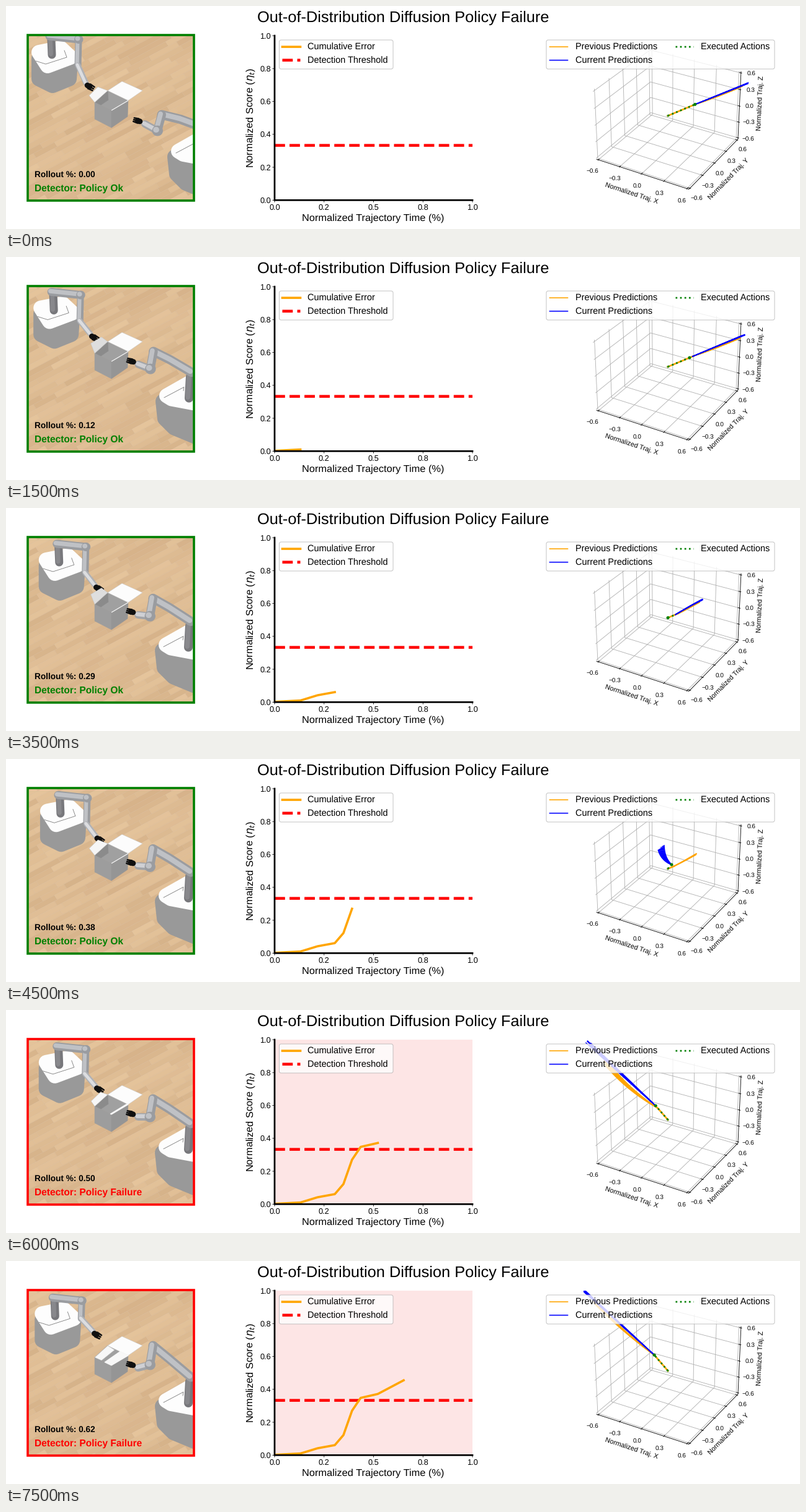
Recreate the animation shown at these times as a matplotlib script. Size 1280x361 px, loop 8 s.

```python
import numpy as np
import matplotlib.pyplot as plt
from matplotlib.animation import FuncAnimation
from matplotlib.collections import PolyCollection
from matplotlib.patches import Circle, FancyBboxPatch, Polygon, Rectangle

plt.rcParams["font.family"] = "Liberation Sans"
plt.rcParams["text.hinting"] = "none"
W, H, PT = 1280, 361, 0.72  # PT: points per pixel at 100 dpi
STEPS, TURN, ALARM = 16, 9, 10  # steps per loop, change of heading, detection

fig = plt.figure(figsize=(W / 100, H / 100), dpi=100, facecolor="white")
ax = fig.add_axes([0, 0, 1, 1])
ax.set_xlim(0, W)
ax.set_ylim(H, 0)
ax.axis("off")

panel = Rectangle((35, 47), 268, 268, transform=ax.transData)
plot_area = Rectangle((433, 48), 319, 266.3, transform=ax.transData)
cube_area = Rectangle((930.5, 48), 266, 266, transform=ax.transData)
live = []  # artists of the current step


def label(x, y, s, px, **kw):
    kw = {"va": "baseline", "zorder": 12, **kw}
    return ax.text(x, y, s, fontsize=px * PT, **kw)


def stroke(pts, color, px, z=3, clip=None, **kw):
    x, y = np.asarray(pts, float).T
    line, = ax.plot(x, y, color=color, lw=px * PT, zorder=z, snap=False, **kw)
    if clip is not None:
        line.set_clip_path(clip)
    return line


def mix(a, b, t):
    return np.array(a) * (1 - t) + np.array(b) * t


def smooth(t):
    t = np.clip(t, 0, 1)
    return t * t * (3 - 2 * t)


# ---------- chart ----------
X0, X1, Y0, Y1 = 433, 752, 314.3, 48


def chart(x, y):
    return np.c_[X0 + (X1 - X0) * np.asarray(x), Y0 + (Y1 - Y0) * np.asarray(y)]


def score(k):
    return np.interp(k, [0, 3, 5, 7, 8, 9, 10, 12, 15],
                     [.002, .01, .042, .061, .122, .27, .348, .372, .455])


def draw_chart():
    for v in np.linspace(0, 1, 6):
        y = Y0 + (Y1 - Y0) * v
        stroke([(X0 - 3.2, y), (X0, y)], "k", 0.8, 6)
        label(427, y + 4.4, f"{v:.1f}", 12.7, ha="right")
    for v in np.linspace(0, 1, 5):
        x = X0 + (X1 - X0) * v
        stroke([(x, Y0), (x, Y0 + 3.2)], "k", 0.8, 6)
        label(x, 329.4, f"{v:.1f}", 12.7, ha="center")
    stroke([(X0, Y1), (X0, Y0), (X1, Y0)], "k", 2.7, 6,
           solid_capstyle="projecting", solid_joinstyle="miter")
    stroke(chart([0, 1], [0.333, 0.333]), "red", 4.54, 4, plot_area, ls="--")
    label(592, 348, "Normalized Trajectory Time (%)", 16.4, ha="center")
    label(395, 181.5, r"Normalized Score ($\eta_t$)", 16.4, ha="center",
          va="center", rotation=90)


# ---------- 3D box ----------
def project(x, y, z):
    """Perspective view at elevation 30, azimuth -60."""
    p = np.array([x, y, z]) * [0.952, 0.952, 0.714]
    s3 = np.sqrt(3)
    u = p @ [s3 / 2, 0.5, 0]
    v = p @ [-0.25, s3 / 4, s3 / 2]
    d = p @ [s3 / 4, -0.75, 0.5]
    k = 1433 / (10 - d)
    return 1068.1 + u * k, 177.3 - v * k


def draw_cube():
    e = 0.625

    def edge(color, z, *pts):
        stroke([project(*p) for p in pts], color, 0.85, z)

    # label centres of the lowest and highest tick on each axis
    marks = (((945, 267), (1090, 315)), ((1113, 311), (1188, 232)),
             ((1196, 215), (1202, 109.5)))
    i1, i2 = e - 0.02, e + 0.01
    for i, t in enumerate(np.linspace(-0.6, 0.6, 5)):
        edge("#b0b0b0", 2, (t, -e, -e), (t, e, -e), (t, e, e))
        edge("#b0b0b0", 2, (e, t, -e), (-e, t, -e), (-e, t, e))
        edge("#b0b0b0", 2, (-e, -e, t), (-e, e, t), (e, e, t))
        edge("k", 3, (t, -i1, -e), (t, -i2, -e))
        edge("k", 3, (i1, t, -e), (i2, t, -e))
        edge("k", 3, (i1, e, t), (i2, e, t))
        for lo, hi in marks:
            x, y = mix(lo, hi, i / 4)
            label(x, y + 3.6, f"{t:.1f}".replace("-", "−"), 10, ha="center")
    edge("k", 3, (-e, -e, -e), (e, -e, -e), (e, e, -e), (e, e, e))
    for x, y, axis, rot in ((1008, 304, "X", -18.2), (1165, 281, "Y", 45.7),
                            (1217, 157.5, "Z", 87.4)):
        label(x, y, f"Normalized Traj. {axis}", 10.9, ha="center", va="center",
              rotation=rot, rotation_mode="anchor")


# ---------- legends ----------
def legend(x, w, entries):
    ax.add_patch(FancyBboxPatch((x + 3, 58), w - 6, 41,
                                boxstyle="round,pad=3,rounding_size=3",
                                fc="white", ec="#adadad", lw=0.9 * PT,
                                alpha=0.8, zorder=10))
    for dx, row, text, color, px, ls in entries:
        y = 66.1 + 21.6 * row
        stroke([(x + dx, y), (x + dx + 29, y)], color, px, 11, ls=ls)
        label(x + dx + 41, y + 5, text, 14.55)


# ---------- wooden floor ----------
def draw_floor():
    rng = np.random.default_rng(4)
    along, across = np.array([0.88, -0.47]), np.array([4.7, 7.1])
    polys, colors = [], []
    for row in range(-28, 29):
        s = -240 - rng.uniform(0, 60)
        while s < 240:
            n = rng.uniform(35, 80)
            a = np.array([170, 181]) + across * row + along * s
            b = a + along * n
            polys.append([a, b, b + across, a + across])
            colors.append(mix((0.84, 0.70, 0.54), (0.90, 0.77, 0.61), rng.random()))
            s += n
    floor = PolyCollection(polys, facecolors=colors, linewidths=0.4, zorder=1,
                           edgecolors=(0.79, 0.63, 0.46, 0.25))
    ax.add_collection(floor)
    floor.set_clip_path(panel)


# ---------- robots ----------
def poly(pts, fc, rim=0.5, ec=None):
    p = Polygon(pts, closed=True, fc=fc, ec=ec or fc, lw=rim * PT,
                joinstyle="round", zorder=3)
    ax.add_patch(p)
    p.set_clip_path(panel)
    live.append(p)


def rod(pts, color, px):
    live.append(stroke(pts, color, px, clip=panel, solid_capstyle="round",
                       solid_joinstyle="round"))


def limb(pts, px, dark="#9a9ca0", light="#bfc1c5"):
    pts = np.asarray(pts, float)
    rod(pts, dark, px)
    rod(pts - [px * 0.13, px * 0.1], light, px * 0.55)


def gripper(at, aim):
    aim = np.array(aim, float)
    side = aim[::-1] * [-0.5, 0.5]
    rod([at - aim * 0.4, at + aim * 0.1], "#101010", 9)
    for k in (-1, 0, 1):
        rod([at + side * k, at + aim + side * k * 0.8], "#101010", 2.6)


def pedestal(off, body, top, seam):
    poly(off + body, "#999999", 24)
    poly(off + top, "#fdfdfd", 24)
    live.append(stroke(off + seam, "#777777", 0.8, clip=panel))


def retreat(k):
    return smooth((k - 11) / 4)


def draw_left(k):
    lift = retreat(k)
    off = np.array([-7 * (1 + np.cos(np.pi * k / 9.5)),
                    0.15 * k - 8 * np.exp(-k / 1.4)])
    elbow = off + (131, 62)
    fore = off + (130, 104 - 13 * lift)
    hand = np.array([134 + 16 * np.sin(np.pi * k / 20), 130 - 11 * lift])
    pedestal(off, [(67, 92), (118, 96), (116, 126), (89, 137), (67, 126)],
             [(67, 83), (102, 76), (118, 91), (81, 105)],
             [(62, 97), (78, 102), (112, 91), (108, 80)])
    limb(off + [(88, 87), (87, 62)], 13, "#77777b", "#88888c")
    limb([off + (84, 57), elbow], 13)
    limb([elbow, fore], 11)
    limb([fore, hand - (5, 5)], 9, "#b0b2b6", "#dcdde0")
    limb([elbow, elbow + (0.5, 0)], 14)
    gripper(hand, (7, 4))


def draw_right(k):
    lift, fast, slow = retreat(k), np.exp(-k), np.exp(-k / 2.2)
    off = np.array([20 * fast - 2, 14 * slow + 5 * lift])
    shoulder = off + (300, 183)
    elbow = np.array([237 + 14 * fast, 145 + 31 * slow - 8 * lift])
    fore = np.array([232 + 12 * fast, 174 + 28 * slow - 6 * lift])
    hand = np.array([202 + 11 * fast, 168 + 18 * fast])
    pedestal(off, [(254, 230), (257, 258), (272, 273), (325, 295), (350, 220)],
             [(260, 221), (297, 200), (345, 215), (305, 233), (268, 226)],
             [(256, 224), (288, 207), (287, 213)])
    limb(off + [(296, 225), (298, 190)], 14, "#77777b", "#88888c")
    limb([shoulder, mix(shoulder, elbow, 0.5) - 3, elbow], 15)
    limb([elbow, fore], 14)
    limb([fore, hand + (11, 5)], 12, "#a2a4a8", "#cfd0d4")
    limb([fore, fore + (0.5, 0)], 17)
    gripper(hand, (-7, -2))


def draw_box(k):
    left, top, right, front = (143, 156), (164, 137), (197, 153), (170, 169)
    push, close = np.exp(-((k - 5) / 2) ** 2), retreat(k)
    a = mix((134 + 7 * push, 145 - 14 * push), (154, 161), close)
    b = mix((148 + 16 * push, 131 - 4 * push), (175, 144), close)
    poly([left, top, right, front], "#a0a0a0")
    poly([left, top, (165, 152), (152, 161)], "#8b8b8b")
    poly([top, (187, 122), (220, 137), right], "#fcfcfc", ec="#c9c9c9")
    poly([left, front, (170, 197), (143, 183)], "#9d9d9d")
    poly([front, right, (196, 179), (170, 197)], "#959595")
    poly([left, a, b, top], (0.97 - 0.27 * push,) * 3, ec="#c4c4c4")
    poly([front, mix(front, left, close * 0.4), mix(right, top, close * 0.4), right],
         "#f8f8f8", 1.2)


# ---------- trajectories ----------
ORIGIN = np.array([1067, 177.7])


def path(k, sag=0, cut=1):
    """Curved plan at step k: to the right first, up and left after the turn."""
    if k < TURN:
        g = 1 / (1 + np.exp(1.5 * (k - 4)))
        start = ORIGIN + np.array([1, -0.42]) * (8 + 36 / (1 + np.exp(k - 5)))
        x = 1122 + 84 * g
        end = np.array([x, 178 - 0.41 * (x - 1067) - 7 * (1 - g)])
        bow = 3 * (g - 1)
    else:
        q = 1 - np.exp((TURN - k) / 1.2)
        start = np.array([1073 - 28 * q, 171 - 19 * q * q])
        end = np.array([1056 - 130 * q, 143 - 100 * q])
        bow = 16 * np.exp(-(k - 10) ** 2)
    ctrl = mix(start, end, 0.5) + (bow + sag) * np.array([-1, 0.9])
    s = np.linspace(0, cut, 25)[:, None]
    return (1 - s) ** 2 * start + 2 * s * (1 - s) * ctrl + s ** 2 * end


def spread(k):
    return 0.7 if k < TURN else 1.6 + 4.4 * np.exp(-(k - TURN) ** 2 / 6)


def bundle(pts, width, color, z, seed):
    rng = np.random.default_rng(seed)
    dx, dy = pts[-1] - pts[0]
    normal = np.array([-dy, dx]) / np.hypot(dx, dy)
    grow = np.linspace(0, 1, len(pts)) ** 0.8
    for shift in np.linspace(-width, width, 11):
        fan = pts + np.outer(shift * grow, normal)
        live.append(stroke(fan[:len(pts) - rng.integers(0, 2)], color, 1.4, z,
                           cube_area))


def draw_paths(k):
    now, before = path(k), path(k - 1, sag=6, cut=0.82)
    start = now[0]
    head = start if k >= TURN else mix(ORIGIN, start, 1 / (1 + np.exp(2 * (k - 4))))
    live.append(stroke([ORIGIN, before[0]], "orange", 2.7, 5, cube_area))
    bundle(before, spread(k - 1), "orange", 5, k)
    bundle(now, spread(k), "blue", 6, k + 50)
    live.append(stroke([ORIGIN, start], "green", 2.7, 7, cube_area, ls=":"))
    for at, r, alpha in ((ORIGIN, 2, 0.45), (head, 2.5, 1)):
        live.append(ax.add_patch(Circle(at, r, fc="green", ec="none",
                                        alpha=alpha, zorder=8)))


label(640, 25.6, "Out-of-Distribution Diffusion Policy Failure", 25.45, ha="center")
draw_floor()
draw_chart()
draw_cube()
legend(440.5, 183.5, [(5, 0, "Cumulative Error", "orange", 3.6, "-"),
                      (5, 1, "Detection Threshold", "red", 4.54, "--")])
legend(871, 368, [(5.5, 0, "Previous Predictions", "orange", 1.6, "-"),
                  (5.5, 1, "Current Predictions", "blue", 1.6, "-"),
                  (208.5, 0, "Executed Actions", "green", 2.7, ":")])
border = ax.add_patch(Rectangle((35.2, 47.2), 267.8, 267.8, fill=False,
                                lw=3.63 * PT, zorder=9))
alarm = ax.add_patch(Rectangle((X0, Y1), X1 - X0, Y0 - Y1, fc="#fde5e5", zorder=1))
rollout = label(46.5, 276.4, "", 13.65, weight="bold")
status = label(46.5, 300, "", 15.5, weight="bold")
error_line = stroke([(X0, Y0), (X0, Y0)], "orange", 3.6, 5, plot_area)


def update(k):
    for artist in live:
        artist.remove()
    live.clear()
    failed = k >= ALARM
    color = "red" if failed else "green"
    border.set_edgecolor(color)
    alarm.set_visible(failed)
    rollout.set_text(f"Rollout %: {k / 24:.2f}")
    status.set_text("Detector: Policy " + ("Failure" if failed else "Ok"))
    status.set_color(color)
    steps = np.arange(k + 1)
    error_line.set_data(*chart(steps / 23, score(steps)).T)
    error_line.set_visible(k > 0)
    draw_left(k)
    draw_box(k)
    draw_right(k)
    draw_paths(k)
    return []


anim = FuncAnimation(fig, update, frames=STEPS, init_func=lambda: [],
                     interval=500, repeat=True, repeat_delay=0, blit=False)
plt.show()
```
